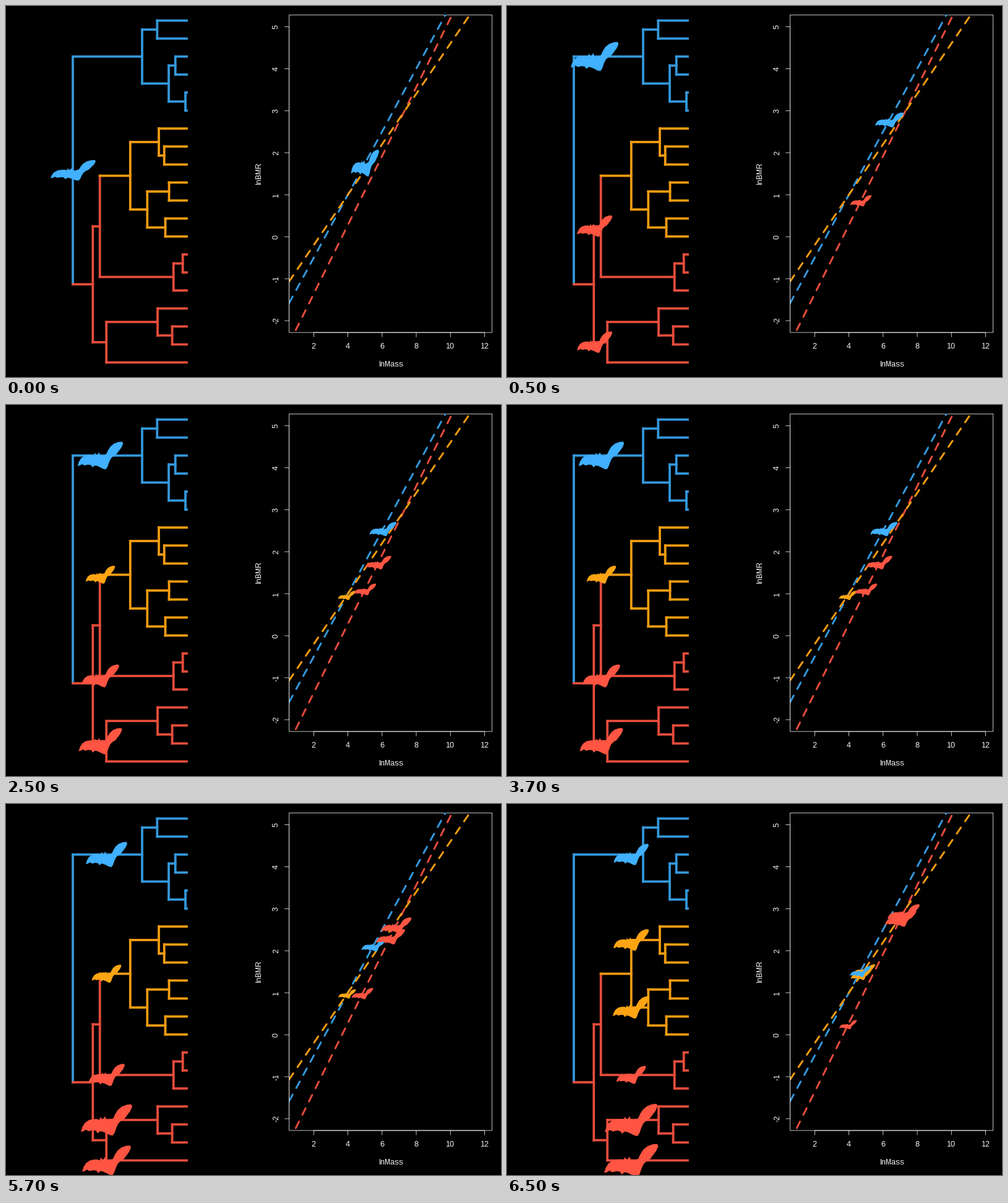
Write a matplotlib script that moves like this. It is 800 by 600 pixels and loops after 8000 ms.

```python
import numpy as np
import matplotlib.pyplot as plt
from matplotlib.animation import FuncAnimation
from matplotlib.collections import PolyCollection

WIDTH, HEIGHT, DPI = 800, 600, 100
PX = 72 / DPI  # points per pixel
plt.rcParams.update({"text.hinting": "native", "text.hinting_factor": 1})

LINE_COLORS = {"blue": "#3498db", "orange": "#f39c12", "red": "#e74c3c"}
BAT_COLORS = {"blue": "#40b0ff", "orange": "#ffa514", "red": "#ff5542"}
REGRESSIONS = {"blue": (-2, 0.75), "red": (-3, 0.82), "orange": (-1.4, 0.6)}

# Tree nodes: (x, color, first child, second child); None is a tip.
BLUE_CLADE = (220, "blue",
              (244.3, "blue", None, None),
              (263, "blue",
               (273.7, "blue", None, None),
               (290, "blue", None, None)))
ORANGE_CLADE = (200.8, "orange",
                (247, "orange", None, (255.7, "orange", None, None)),
                (228.3, "orange",
                 (263.5, "orange", None, None),
                 (257.5, "orange", None, None)))
RED_UPPER = (270.7, "red", (285.7, "red", None, None), None)
RED_LOWER = (162.2, "red",
             (245, "red", None, (268.6, "red", None, None)),
             None)
TREE = (108, "blue", BLUE_CLADE,
        (140.3, "red", (151.7, "red", ORANGE_CLADE, RED_UPPER), RED_LOWER))
TIP_X, TIP_TOP, TIP_STEP = 292, 23.55, 29.1

# Chart box in pixels and the data limits at its edges.
LEFT, RIGHT, TOP, BOTTOM = 457.6, 785.6, 14.4, 528
MASS_MIN, MASS_MAX = 0.56, 12.44
RATE_MIN, RATE_MAX = -2.28, 5.28

# Bat outline in percent of its bounding box, y pointing down.
BAT = np.array([
    (0, 88), (3, 72), (8, 59), (16, 50), (25, 47), (32, 47), (36, 50),
    (38, 40), (41, 47), (44, 46), (47, 38), (49, 47), (51, 52), (56, 50),
    (63, 45), (67, 31), (72, 18), (80, 7), (90, 1), (98, 0), (100, 7),
    (96, 22), (90, 35), (85, 46), (78, 53), (73, 61), (69, 75), (66, 90),
    (62, 100), (56, 98), (49, 92), (42, 87), (37, 86), (33, 93), (29, 84),
    (22, 83), (15, 86), (10, 81), (5, 86),
]) / 100 - 0.5

# Each stage: x on the tree, then (color, y on the tree, log mass) per bat.
STAGES = [
    (108.5, [("blue", 265.8, 5.0)]),
    (141.7, [("blue", 81.7, 6.37), ("red", 356, 4.7), ("red", 543.7, 4.7)]),
    (152.5, [("orange", 274.5, 3.93), ("blue", 81.7, 6.05),
             ("red", 438.2, 5.0), ("red", 543.7, 5.78)]),
    (162.5, [("orange", 274.5, 3.95), ("blue", 81.7, 5.51),
             ("red", 438.2, 4.85), ("red", 511, 6.83), ("red", 576.4, 6.5)]),
    (200.7, [("orange", 220, 4.72), ("orange", 329, 4.9), ("blue", 81.7, 4.67),
             ("red", 438.2, 3.95), ("red", 511, 7.03), ("red", 576.4, 7.2)]),
]


def plot_x(mass):
    return LEFT + (mass - MASS_MIN) / (MASS_MAX - MASS_MIN) * (RIGHT - LEFT)


def plot_y(rate):
    return BOTTOM - (rate - RATE_MIN) / (RATE_MAX - RATE_MIN) * (BOTTOM - TOP)


def draw_branch(node, tips):
    """Draw a subtree and return its position and color."""
    if node is None:
        return TIP_X, TIP_TOP + TIP_STEP * next(tips), None
    x, color, *children = node
    ends = [draw_branch(child, tips) for child in children]
    ys = [end[1] for end in ends]
    style = dict(lw=3.75 * PX, solid_capstyle="projecting", snap=False)
    ax.plot([x, x], ys, color=LINE_COLORS[color], zorder=1, **style)
    for end_x, y, end_color in ends:
        ax.plot([x, end_x], [y, y], color=LINE_COLORS[end_color or color],
                zorder=2, **style)
    return x, sum(ys) / 2, color


def label(x, y, text, rotation=0):
    ax.text(x, y, text, color="white", fontsize=12 * PX, rotation=rotation,
            family="Liberation Sans", ha="center", va="baseline",
            rotation_mode="anchor")


def draw_chart():
    thin = dict(lw=0.75 * PX, snap=False)
    frame = plt.Rectangle((LEFT, TOP), RIGHT - LEFT, BOTTOM - TOP, fill=False,
                          ec="white", **thin)
    ax.add_patch(frame)

    def axis_line(xs, ys):
        ax.plot(xs, ys, color="white", solid_capstyle="round", **thin)

    axis_line([plot_x(2), plot_x(12)], [BOTTOM, BOTTOM])
    axis_line([LEFT, LEFT], [plot_y(-2), plot_y(5)])
    for mass in range(2, 13, 2):
        x = plot_x(mass)
        axis_line([x, x], [BOTTOM, BOTTOM + 7.2])
        label(x, 554, str(mass))
    for rate in range(-2, 6):
        y = plot_y(rate)
        axis_line([LEFT - 7.2, LEFT], [y, y])
        label(440, y, str(rate), 90)
    label(621.6, 583, "lnMass")
    label(412, 271.2, "lnBMR", 90)

    masses = np.array([MASS_MIN, MASS_MAX])
    for color in ("blue", "red", "orange"):
        intercept, slope = REGRESSIONS[color]
        line, = ax.plot(plot_x(masses), plot_y(intercept + slope * masses),
                        color=LINE_COLORS[color], lw=3 * PX,
                        ls=(0, (4, 4)), dash_capstyle="round", zorder=3)
        line.set_clip_path(frame)


def bat(x, y, width, height):
    return BAT * (width, height) + (x, y)


def update(frame):
    stage = (frame + 3) // 4
    tree_x, bats = STAGES[stage]
    outlines, colors = [], []
    for color, tree_y, mass in bats:
        tree_width, chart_width = 12.15 * mass, 7.25 * mass
        tree_height, chart_height = 0.61 * tree_width, 0.525 * chart_width
        if stage == 0:
            tree_width, tree_height = 73, 33.5
            chart_width, chart_height = 45.5, 43.5
        intercept, slope = REGRESSIONS[color]
        outlines.append(bat(tree_x, tree_y, tree_width, tree_height))
        outlines.append(bat(plot_x(mass), plot_y(intercept + slope * mass),
                            chart_width, chart_height))
        colors += [BAT_COLORS[color]] * 2
    flock.set_verts(outlines)
    flock.set_facecolor(colors)
    return [flock]


fig = plt.figure(figsize=(WIDTH / DPI, HEIGHT / DPI), dpi=DPI,
                 facecolor="black")
ax = fig.add_axes([0, 0, 1, 1])
ax.set(xlim=(0, WIDTH), ylim=(HEIGHT, 0))
ax.axis("off")
draw_branch(TREE, iter(range(20)))
draw_chart()
flock = PolyCollection([], linewidths=0, zorder=5)
ax.add_collection(flock, autolim=False)

animation = FuncAnimation(fig, update, frames=16, interval=500, repeat=True,
                          repeat_delay=0, blit=False)
plt.show()
```
